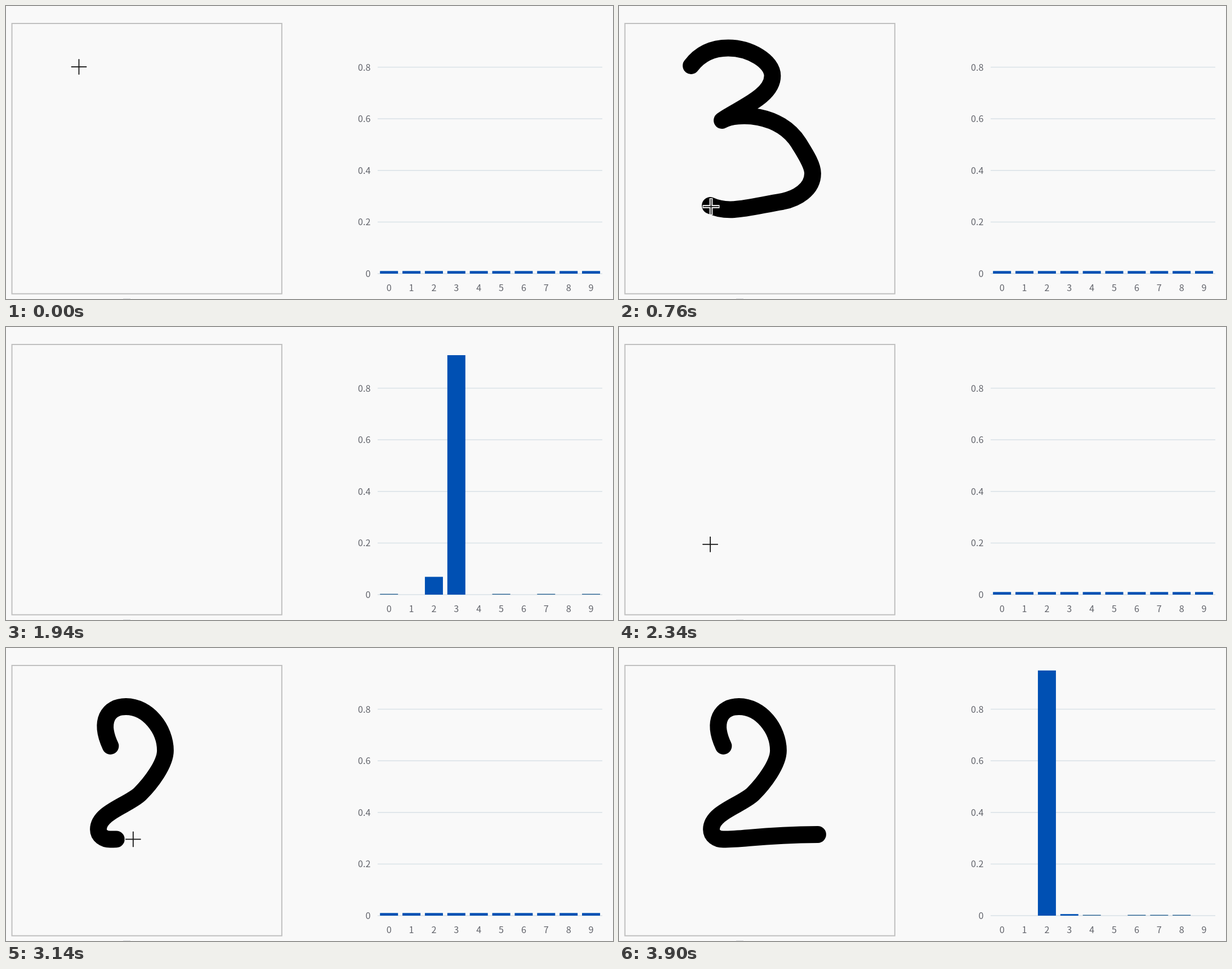
An HTML page with a canvas for the animation above (3980 ms loop, 1078x520 px).

```html
<!DOCTYPE html>
<html lang="en">
<head>
<meta charset="utf-8">
<title>Digit recognition</title>
<style>
html, body { margin: 0; width: 100%; height: 100%; overflow: hidden; background: #f9f9f9; }
canvas { display: block; }
svg { position: absolute; }
</style>
</head>
<body>
<svg width="0" height="0">
  <path id="three" fill="none" d="M128 106 C146 82 170 74.5 194 74.5 C232 74.5 272.5 98 272.5 124
    C272.5 160 215 181 183 203 C210 188 285 190 319 243 C328 258 344 281 344 297
    C344 326 315 342 290 347 C235 356 195 370 162 354"/>
  <path id="two" fill="none" d="M185.5 174 C165 130 181 104 213 104 C252 104 283 144 283 182
    C283 206 257 240 238 259 C217 279 164 292 164 322 C164 333 174 339.5 185 339.5
    C225 339.5 250 332 353 331"/>
</svg>
<canvas id="stage" width="1078" height="520"></canvas>
<script>
const ctx = document.getElementById('stage').getContext('2d');
const LOOP = 3980, BASE = 475, UNIT = 458;
const LEAD = 20; // ms the cursor runs ahead of the ink

// A pen stroke drawn at constant speed (px per ms), visible from show to clear.
function stroke(id, show, begin, clear, speed) {
  const path = document.getElementById(id);
  const shape = new Path2D(path.getAttribute('d'));
  const total = path.getTotalLength();
  const drawn = t => Math.min(total, Math.max(0.01, (t - begin) * speed));
  return {
    cursor(t) {
      const p = path.getPointAtLength(drawn(t + LEAD));
      return [p.x + 1.5, p.y + 2];
    },
    draw(t) {
      if (t < show || t >= clear) return;
      ctx.save();
      ctx.filter = 'blur(0.4px)';
      ctx.lineWidth = 29.8;
      ctx.lineCap = ctx.lineJoin = 'round';
      ctx.strokeStyle = '#000';
      const length = drawn(t);
      if (length < total) ctx.setLineDash([length, 2 * total]);
      ctx.stroke(shape);
      ctx.restore();
    }
  };
}

const three = stroke('three', 40, 40, 1860, 1.138);
const two = stroke('two', 2760, 2840, LOOP, 1.467);

// Eased move between two points, optionally bowed to the left.
function glide(t, t0, t1, [x0, y0], [x1, y1], bow = 0) {
  const u = Math.min(1, Math.max(0, (t - t0) / (t1 - t0)));
  const e = u * u * (3 - 2 * u);
  return [x0 + (x1 - x0) * e - bow * Math.sin(Math.PI * e), y0 + (y1 - y0) * e];
}

function cursorAt(t) {
  const rest = [318, 467], low = [306, 484];
  if (t < 760) return three.cursor(t);
  if (t < 1160) return glide(t, 760, 1080, three.cursor(760), rest);
  if (t < 1620) return glide(t, 1160, 1620, rest, low);
  if (t < 1700) return glide(t, 1620, 1700, low, [285, 498]);
  if (t < 2080) return null;
  if (t < 2760) return glide(t, 2080, 2740, [190, 497], [186, 175], 30);
  return t < 3480 ? two.cursor(t) : null;
}

function drawCursor(at) {
  if (!at) return;
  const [x, y] = at;
  for (const [arm, width, color] of [[15, 5.6, '#fff'], [13.8, 1.9, '#1c1c1c']]) {
    ctx.fillStyle = color;
    ctx.fillRect(x - arm, y - width / 2, arm * 2, width);
    ctx.fillRect(x - width / 2, y - arm, width, arm * 2);
  }
}

const TINY = 0.003;
const asThree = { 0: TINY, 2: 0.069, 3: 0.928, 5: TINY, 7: TINY, 9: TINY };
const asTwo = { 2: 0.95, 3: 0.006, 4: TINY, 6: TINY, 7: TINY, 8: TINY };
const blank = Array(10).fill(0.0102);

function valuesAt(t) {
  if (t >= 3620) return asTwo;
  return t >= 1120 && t < 2260 ? asThree : blank;
}

function label(text, x, y, align) {
  ctx.fillStyle = '#62646b';
  ctx.textAlign = align;
  ctx.fillText(text, x, y);
}

function drawChart(values) {
  ctx.font = '500 16.2px "Noto Sans CJK JP", "Noto Sans CJK SC", "Noto Sans CJK", "Open Sans", sans-serif';
  for (let i = 0; i < 5; i++) {
    const y = BASE - i * 0.2 * UNIT;
    ctx.fillStyle = '#dbe3e8';
    ctx.fillRect(660, y - 0.8, 399, 1.6);
    label(i ? (i / 5).toFixed(1) : '0', 647.5, y + 6, 'right');
  }
  for (let i = 0; i < 10; i++) {
    const x = 680.2 + i * 39.87, value = values[i] || 0;
    label(i, x, 506, 'center');
    ctx.filter = 'blur(0.4px)';
    ctx.fillStyle = value > TINY ? '#0050b3' : '#2b6492';
    ctx.fillRect(x - 16, BASE - value * UNIT, 32, value * UNIT);
    ctx.filter = 'none';
  }
}

function draw(t) {
  ctx.fillStyle = '#f9f9f9';
  ctx.fillRect(0, 0, 1078, 520);
  ctx.strokeStyle = '#c0c0c0';
  ctx.lineWidth = 2;
  ctx.strokeRect(10.5, 31, 479.3, 479.7);
  ctx.fillStyle = '#d6d7da';
  ctx.fillRect(208, 519, 13, 1);

  drawChart(valuesAt(t));
  three.draw(t);
  two.draw(t);
  drawCursor(cursorAt(t));
}

const start = performance.now();
function frame() {
  draw((performance.now() - start) % LOOP);
  requestAnimationFrame(frame);
}
frame();
</script>
</body>
</html>
```
